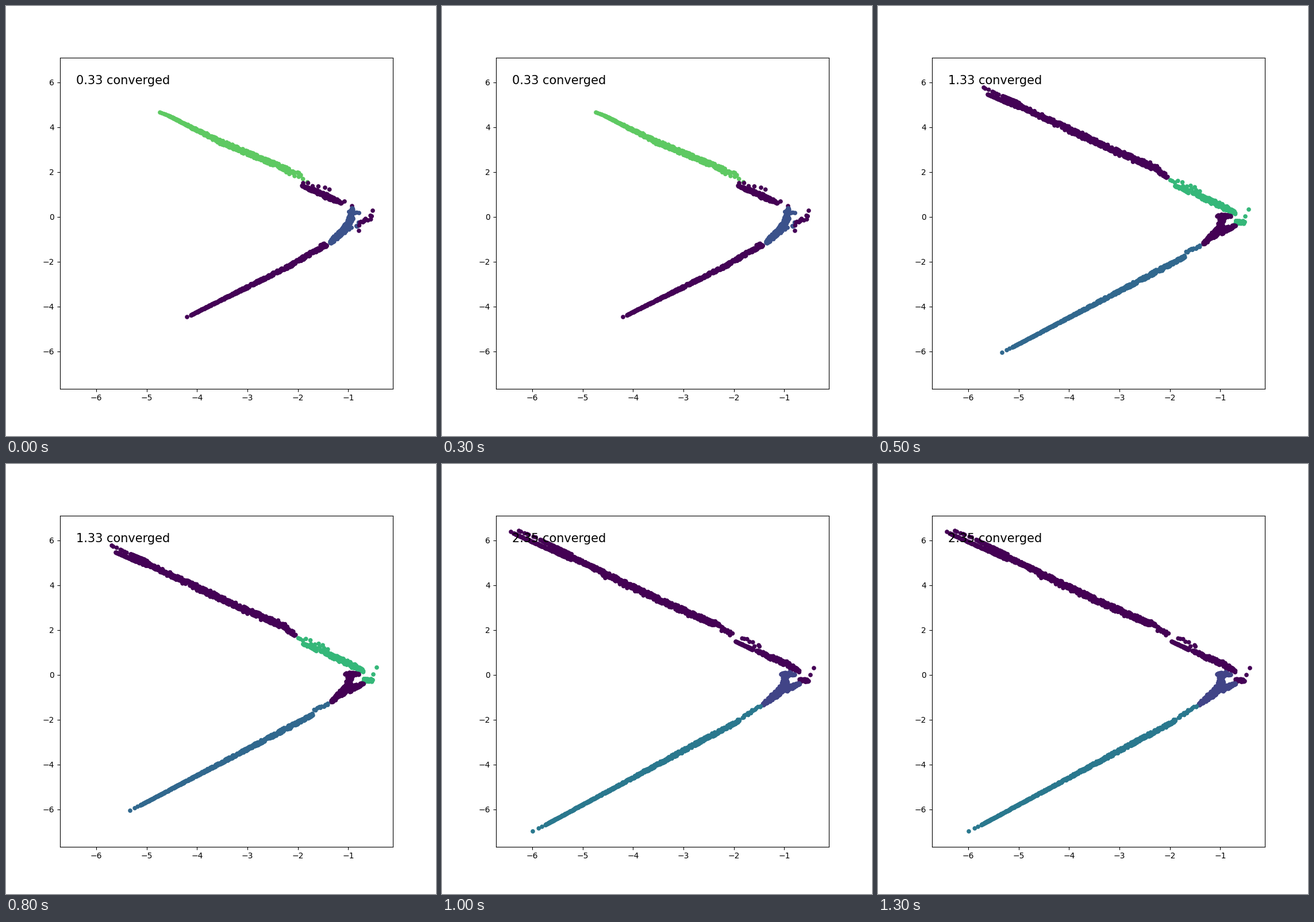
Animation of 748x748 px, one loop 1.5 s. Source, as a matplotlib script:

```python
import numpy as np
import matplotlib.pyplot as plt
from matplotlib.animation import FuncAnimation

SIZE, DPI = 748, 100
STEP_MS = 500
XLIM, YLIM = (-6.724, -0.114), (-7.672, 7.108)

rng = np.random.default_rng(7)


def band(path, width, density=1.7):
    """Random points along a path in stage pixels; widths are spread evenly over it."""
    path, width = np.array(path, float), np.atleast_1d(width)
    step = np.diff(path, axis=0)
    length = np.hypot(*step.T)
    s = np.r_[0, np.cumsum(length)]
    n = int(s[-1] * density) + 2
    t = np.linspace(0, s[-1], n)
    t[1:-1] += rng.uniform(-0.5, 0.5, n - 2) / density
    t = np.clip(t, 0, s[-1])
    seg = np.clip(np.searchsorted(s, t) - 1, 0, len(step) - 1)
    off = rng.uniform(-1, 1, n) * np.interp(t, np.linspace(0, s[-1], len(width)), width)
    off *= np.where(rng.random(n) < 0.05, 1.3, 1)
    normal = np.c_[-step[:, 1], step[:, 0]] / length[:, None]
    center = np.c_[np.interp(t, s, path[:, 0]), np.interp(t, s, path[:, 1])]
    return center + normal[seg] * off[:, None]


def cluster(shade, *parts):
    pts = np.vstack(parts)
    return pts, np.tile(plt.cm.viridis(shade), (len(pts), 1))


def upper_arm(tip, low, high, merge):
    """Two thin strands that merge into one thick arm with a ragged end."""
    x, y = merge
    return np.vstack([
        band(tip, 0.5, 0.18),
        band([low, (x, y + 4)], (0.3, 1.5)),
        band([high, (x, y - 4)], (0.3, 1.5)),
        band([merge, (380, 237), (475, 279)], (3, 4, 4)),
        band([(280, 195), (450, 273)], 1.5, 0.1),
        band([(471, 276), (504, 297)], (5, 3), 0.6),
    ])


def lower_arm(tip, left, right, link):
    return np.vstack([
        band(tip, 0, 0.1),
        band([left, right], (0.5, 0.8, 1.2, 1.8, 2.6, 3, 2)),
        band(link, 2, 0.4),
    ])


def elbow(start, width, strays, tip):
    """Right end of the upper arm with a small cluster below it."""
    x, y = tip
    return np.vstack([
        band([start, (541, 323)], width),
        band([(547, 325), (600, 349), (622, 361)], (1.5, 3.5, 4, 4.5, 1.5)),
        band([(622, 376), (638, 377)], (3, 2)),
        band(strays, 3.5, 0.2),
        [tip, (x - 6, y + 12)],
    ])


def hook(tip):
    """Bent cluster joining both arms; tip is its lower left end."""
    return np.vstack([
        band([(590, 366), (614, 366)], (1, 4.5, 1)),
        band([(600, 364), (595, 388), (582, 400), tip], (3.5, 5.5, 5, 1.5), 2.5),
        band([(622, 382), (596, 393)], (1.5, 5), 2.5),
    ])


def first_stage():
    yield cluster(
        0.75,
        band([(268, 185), (290, 194)], 0.3, 0.3),
        band([(283, 191), (370, 235), (430, 260), (488, 284)], (0.3, 2, 3.5, 3.5, 3.5)),
        band([(488, 285), (512, 296)], (4, 5), 0.5),
        band([(512, 296), (524, 307)], 1, 0.1))
    yield cluster(
        0,
        band([(515, 313), (550, 327), (584, 343)], (0.5, 3.5, 4, 1)),
        band([(517, 308), (563, 318)], 3, 0.1),
        band([(589, 340), (602, 348)], 0, 0.01),
        [(638, 356)])
    yield cluster(
        0.25,
        band([(603, 352), (600, 370), (588, 390), (564, 412)], (1, 4.5, 4, 5, 4.5, 2), 2.5),
        band([(597, 357), (614, 361)], 1.5, 0.25),
        band([(614, 377), (599, 391)], 3, 0.15))
    yield cluster(
        1,
        band([(557, 415), (490, 454), (322, 538)], (3.5, 2.5, 2.2, 1.2, 0.5)),
        band([(614, 381), (637, 367)], 4, 0.35),
        [(315, 541), (614, 391)])


def second_stage():
    yield cluster(1, upper_arm(tip=[(184, 142), (210, 154)], low=(191, 154),
                               high=(217, 157), merge=(245, 173)))
    yield cluster(2 / 3, elbow((517, 313), (1, 2.5), [(509, 302), (560, 322)], (645, 354)))
    yield cluster(0, hook((566, 414)))
    yield cluster(1 / 3, lower_arm(tip=[(216, 603), (229, 596)], left=(234, 594),
                                   right=(534, 436), link=[(560, 417), (537, 429)]))


def third_stage():
    yield cluster(0, upper_arm(tip=[(134, 116), (163, 128)], low=(125, 121),
                               high=(171, 132), merge=(225, 162)), [(120, 118)])
    yield cluster(1, elbow((511, 309), (0.3, 1.2), [(523, 302), (552, 318)], (647, 355)))
    yield cluster(0.2, hook((558, 419)))
    yield cluster(0.4, lower_arm(tip=[(158, 639), (174, 631)], left=(180, 628),
                                 right=(518, 446), link=[(554, 421), (523, 441)]))


def build(stage):
    """Join the clusters and convert stage pixels to data coordinates."""
    points, colors = map(np.vstack, zip(*stage()))
    points[:, 1] = SIZE - points[:, 1]
    return ax.transData.inverted().transform(points), colors


fig, ax = plt.subplots(figsize=(SIZE / DPI, SIZE / DPI), dpi=DPI)
ax.set(xlim=XLIM, ylim=YLIM, xticks=range(-6, 0))
cloud = ax.scatter([], [], s=20)
label = ax.text(0.05, 0.92, "", transform=ax.transAxes, fontsize=15)

stages = [build(s) for s in (first_stage, second_stage, third_stage)]
times = (0.33, 1.33, 2.35)


def update(i):
    points, colors = stages[i]
    cloud.set_offsets(points)
    cloud.set_color(colors)
    label.set_text(f"{times[i]:.2f} converged")
    return cloud, label


anim = FuncAnimation(fig, update, frames=len(stages), interval=STEP_MS,
                     repeat=True, repeat_delay=0)
plt.show()
```
